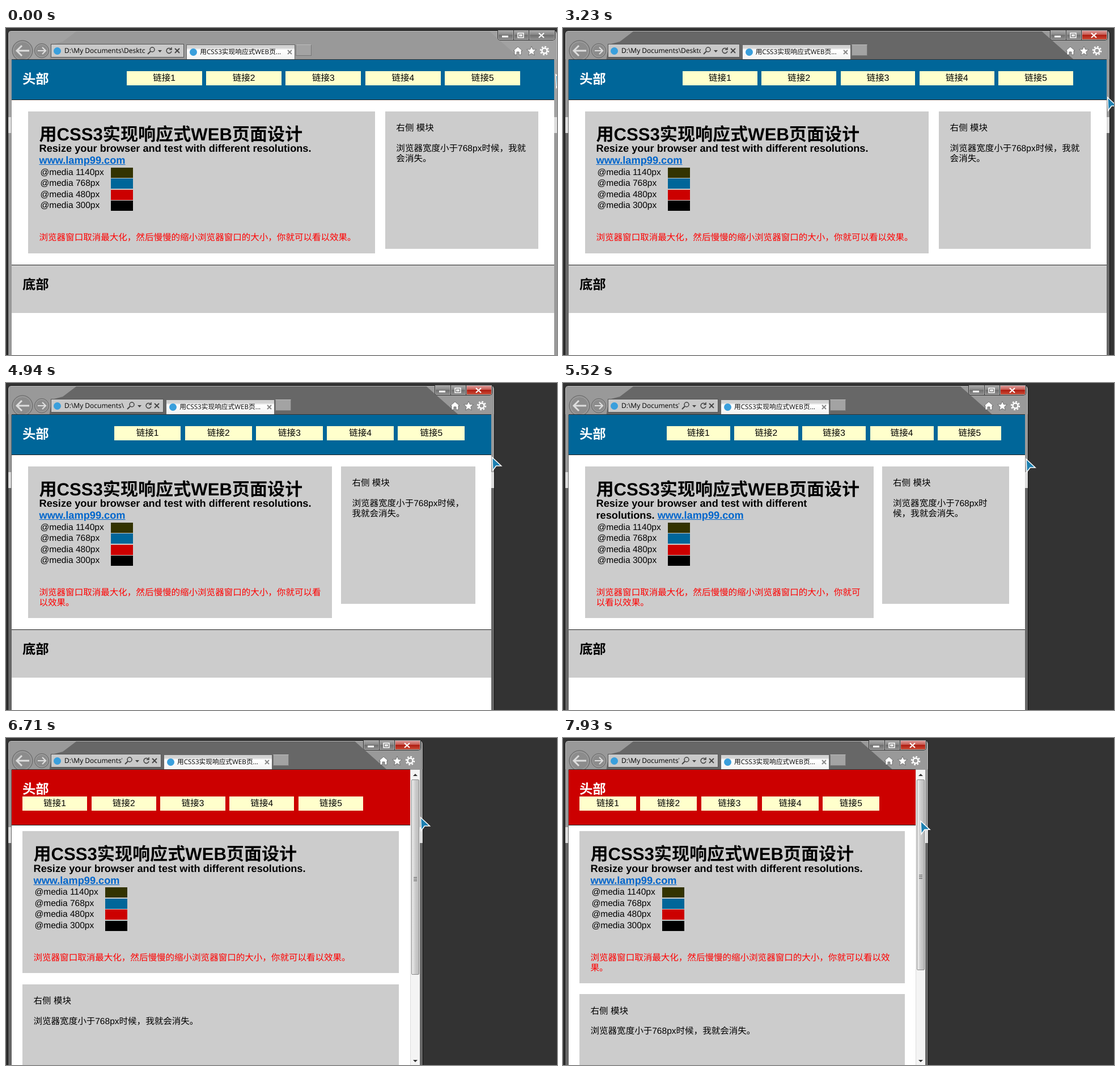
Write an HTML page that moves like this. It is 972 by 576 pixels and loops after 8000 ms.

```html
<!DOCTYPE html>
<html lang="zh-CN">
<head>
<meta charset="utf-8">
<title>响应式页面</title>
<style>
* { box-sizing: border-box; margin: 0; padding: 0; }
html, body { width: 972px; height: 576px; overflow: hidden; background: #333; }
body {
  position: relative;
  font: 15.54px/17.8px 'Liberation Sans', 'Noto Sans CJK SC', 'Noto Sans CJK', sans-serif;
  text-rendering: geometricPrecision;
  text-spacing-trim: space-all;
  --shade: color-mix(in srgb, #999, #676767 calc(var(--on) * 100%));
  --shine: color-mix(in srgb, #a2a2a2, #999 calc(var(--on) * 100%));
}
body > *, .win > * { position: absolute; }
svg { overflow: visible; fill: none; stroke: #fff; }

/* browser frame */
.win {
  left: 3px; top: 4px; width: calc(var(--R) - 3px); height: 600px;
  border: 1px solid #111; border-radius: 6px 6px 0 0; overflow: hidden;
  background: var(--shade); box-shadow: inset 0 0 0 1px #bbb;
}
.edge {
  top: 50px; width: 5px; height: 540px;
  background: linear-gradient(var(--shine) 102px, #ddd 102px 130px, var(--shade) 130px);
}
.glare { top: 1px; height: 50px; background: var(--shine); }
.glare.l { left: 1px; width: 119px; clip-path: polygon(0 0, 100% 0, 80% 36%, 64% 46%, 60% 100%, 0 100%); }
.glare.r { right: 1px; width: 118px; clip-path: polygon(0 0, 100% 0, 100% 100%, 48% 100%); }
.buttons { left: calc(var(--R) - 106px); top: 4px; display: flex; height: 18px; border: 1px solid #333; border-top: 0; border-radius: 0 0 5px 5px; overflow: hidden; }
.buttons i { width: 27px; box-shadow: inset 0 0 0 1px #aaa; background: linear-gradient(#aaa, #858585 50%, #707070 50%, #909090); }
.buttons i + i { border-left: 1px solid #333; }
.buttons i:last-child { width: 46px; position: relative; }
.buttons i:last-child::after { content: ''; position: absolute; inset: 1px; opacity: var(--on); background: linear-gradient(#d99, #c65348 50%, #b01d12 50%, #c84a35); }
.address {
  left: 79px; top: 28px; width: calc(var(--A) - 79px); height: 24px;
  background: #c9c9c9; border: 1px solid #555;
}
.address span, .tab span { position: absolute; white-space: nowrap; overflow: hidden; font-family: 'Open Sans', 'Noto Sans CJK SC', 'Noto Sans CJK', sans-serif; }
.address span { left: 23px; right: 68px; font-size: 12px; line-height: 22px; }
.dot { position: absolute; width: 13px; height: 13px; border-radius: 50%; background: #3a9fdc; }
.tab {
  left: calc(var(--A) + 4px); top: 29px; width: 192px; height: 26px;
  border: 1px solid #666; border-bottom: 0; background: linear-gradient(#d2d2d2 20%, #fff 35%, #f2f2f2);
}
.tab span { left: 23px; font-size: 11.7px; line-height: 25px; }
.stub { left: calc(var(--A) + 197px); top: 29px; width: 28px; height: 20px; background: #a3a3a3; border: 1px solid #777; border-top-color: #bbb; }

/* page */
.page {
  left: 9.5px; top: 55px; width: var(--W); height: 521px;
  border-top: 1px solid #333; background: #fff; overflow: hidden;
}
header { position: relative; height: 71px; background: #069; border-bottom: 1px solid #222; }
h2 { font-size: 23.35px; line-height: 30px; padding: 19px 0 0 19.5px; }
header h2 { color: #fff; }
nav { position: absolute; display: flex; gap: 7.4px; top: 20px; left: calc(var(--W) * .197 + 14.4px); }
nav a { width: calc(var(--W) * .1368 + 2px); height: 25px; background: #ffc; text-align: center; line-height: 26px; }
main, aside { background: #ccc; }
main { margin: 19.5px 0 0 29.5px; padding: 23px 19.15px 17.5px 19.5px; width: calc(var(--inner) * .68); }
h1 { font-size: 31.1px; line-height: 35.6px; }
h3 { font-size: 18.2px; line-height: 21.2px; margin-top: -3px; }
h3 a { color: #06c; text-decoration: underline; }
.row { position: relative; height: 19.6px; line-height: 20px; padding-left: 2px; }
.row i { position: absolute; left: 126.5px; top: 1px; width: 39px; height: 18px; }
.red { color: red; margin-top: 38.5px; }
aside { position: absolute; top: 91px; right: 28.5px; width: calc(var(--inner) * .3); height: 242px; padding: 21.3px 17px 0 19.5px; }
aside p + p { margin-top: 17.8px; }
footer { margin-top: 20px; height: 85px; background: #ccc; border-top: 1.5px solid #222; }
.bar { display: none; top: 56px; left: calc(var(--R) - 22.7px); width: 17px; height: 520px; background: #f4f4f4; border-left: 1px solid #ddd; }
.bar i { position: absolute; left: 1px; top: 17px; width: 14px; height: var(--thumb); border: 1px solid #888; border-radius: 2px; background: linear-gradient(90deg, #eee, #ccc 50%, #bbb); }
.bar i::after { content: ''; position: absolute; left: 3px; top: 50%; width: 6px; height: 7px; background: repeating-linear-gradient(#555 0 1px, transparent 1px 3px); }
.bar svg { position: absolute; fill: #333; stroke: none; }

.narrow .bar { display: block; }
.narrow header { height: 98px; background: #c00; }
.narrow nav { left: 19.5px; top: 47px; }
.narrow nav a { width: calc(var(--W) * .1597 + 2px); }
.narrow main { margin: 10px 19.5px 0; width: auto; }
.narrow aside { position: static; margin: 19.5px 19.5px 0; width: auto; }
.cursor { left: 0; top: 0; transform: translate(var(--x), var(--y)); }
</style>
</head>
<body>
<div class="win">
  <div class="glare l"></div><div class="glare r"></div>
  <div class="edge" style="left:0"></div><div class="edge" style="right:0"></div>
</div>
<svg width="80" height="56">
  <g fill="#8c8c8c" stroke="#666"><circle cx="29" cy="40" r="18"/><circle cx="63" cy="40" r="12.5"/></g>
  <g stroke="#a8a8a8"><circle cx="29" cy="40" r="16"/><circle cx="63" cy="40" r="11"/></g>
  <g stroke="#ddd">
    <path d="M41 40H20M28 31l-9 9 9 9" stroke-width="3"/>
    <path d="M56 40h13M64 34l6 6-6 6" stroke-width="2.2"/>
  </g>
</svg>
<div class="buttons"><i></i><i></i><i></i></div>
<svg style="left:calc(var(--R) - 106px);top:0" width="106" height="56">
  <path d="M8 15h11" stroke-width="3"/>
  <path d="M36 9h10v8h-10zM39 12h4v2h-4z" stroke-width="1.5"/>
  <path d="M73 9l9 8M82 9l-9 8" stroke-width="2.2"/>
  <path d="M36 33l8 7h-2v7h-4v-5h-4v5h-4v-7h-2z" fill="#fff" stroke="#555" stroke-width=".7"/>
  <path d="M60 32l2.3 5.6 6 .4-4.6 4 1.5 6-5.2-3.2-5.2 3.2 1.5-6-4.6-4 6-.4z" fill="#fff" stroke="#555" stroke-width=".7"/>
  <circle cx="83" cy="40" r="4.5" stroke-width="2.5"/>
  <circle cx="83" cy="40" r="7" stroke-width="2.5" stroke-dasharray="2.75"/>
</svg>
<div class="address"><b class="dot" style="left:4px;top:5px"></b><span>D:\My Documents\Desktop\index.html</span></div>
<svg style="left:calc(var(--A) - 70px);top:28px;stroke:#444" width="70" height="24">
  <circle cx="14" cy="10" r="4" stroke-width="1.5"/>
  <path d="M11 13l-5 5" stroke-width="2"/>
  <path d="M24 11h7l-3.5 4z" fill="#444" stroke="none"/>
  <path d="M47 9a4.5 4.5 0 1 0 1 4M48 6v4h-4" stroke-width="1.5"/>
  <path d="M54 8l8 8M62 8l-8 8" stroke-width="1.8"/>
</svg>
<div class="tab"><b class="dot" style="left:5px;top:6px"></b><span>用CSS3实现响应式WEB页...</span>
  <svg style="position:absolute;left:177px;top:8px;stroke:#888" width="9" height="9"><path d="M1 1l7 7M8 1l-7 7" stroke-width="2"/></svg>
</div>
<div class="stub"></div>
<div class="page">
  <header><h2>头部</h2>
    <nav><a>链接1</a><a>链接2</a><a>链接3</a><a>链接4</a><a>链接5</a></nav>
  </header>
  <main>
    <h1>用CSS3实现响应式WEB页面设计</h1>
    <h3>Resize your browser and test with different resolutions. <a>www.lamp99.com</a></h3>
    <div class="row">@media 1140px<i style="background:#330"></i></div>
    <div class="row">@media 768px<i style="background:#069"></i></div>
    <div class="row">@media 480px<i style="background:#c00"></i></div>
    <div class="row">@media 300px<i style="background:#000"></i></div>
    <p class="red">浏览器窗口取消最大化，然后慢慢的缩小浏览器窗口的大小，你就可以看以效果。</p>
  </main>
  <aside><p>右侧 模块</p><p>浏览器宽度小于768px时候，我就会消失。</p></aside>
  <footer><h2>底部</h2></footer>
</div>
<div class="bar"><i></i><svg width="16" height="520"><path d="M4 11h8l-4-4zM4 511h8l-4 4z"/></svg></div>
<svg class="cursor" width="20" height="26"><path d="M0 0l16 15h-9l-6 8z" fill="#1c7fb0" stroke-width="1.5"/></svg>

<script>
const LOOP = 8000, DRAG_START = 3170, STEP = 58.77;
// [drag step, right edge of the window]
const edgeKeys = [[0, 968], [12, 929.5], [13, 924], [28, 867], [30, 861.7], [42, 813], [48, 781], [56, 742], [60, 735.5], [71, 691], [81, 645]];
// [ms, x, y] while the pointer approaches the window edge
const approach = [[890, 970, 84], [1050, 955, 98], [1280, 967, 119], [1440, 969, 121]];

function lerpKeys(keys, at, column = 1) {
  if (at <= keys[0][0]) return keys[0][column];
  const i = keys.findIndex(key => key[0] >= at);
  if (i < 0) return keys[keys.length - 1][column];
  const a = keys[i - 1], b = keys[i];
  return a[column] + (b[column] - a[column]) * (at - a[0]) / (b[0] - a[0]);
}

function pointer(t, step, right) {
  if (t < 100) return [970, 82];
  if (t < 890) return [990, 82];
  if (t < 2180) {
    const tick = t < 1280 ? 890 + Math.floor((t - 890) / 55) * 55 : t < 1420 ? 1280 : 1440;
    return [lerpKeys(approach, tick), lerpKeys(approach, tick, 2)];
  }
  return [right - 4 - 2 * Math.max(0, step - 76), 122 + .3 * step];
}

function draw(now) {
  const t = now % LOOP;
  const dragging = t >= DRAG_START;
  const step = dragging ? Math.min(81, Math.floor((t - DRAG_START) / STEP + .15)) : 0;
  const right = dragging ? lerpKeys(edgeKeys, step) : t < 2180 ? 973 : 971;
  const content = right - 5.7;
  const narrow = content - 9.5 < 747;
  const width = content - 9.5 - (narrow ? 17 : 0);
  const [x, y] = pointer(t, step, right);
  const active = t < 1600 ? 0 : Math.min(1, (1 + Math.floor((t - 1600) / 60)) / 3);
  const px = {
    R: right, W: width, x, y,
    A: Math.max(274, 278 + (right - 861) * .324),
    inner: content - 67.5,
    thumb: width < 637 ? 336 : 344
  };
  const body = document.body;
  for (const name in px) body.style.setProperty('--' + name, px[name].toFixed(2) + 'px');
  body.style.setProperty('--on', active);
  body.classList.toggle('narrow', narrow);
  requestAnimationFrame(() => draw(performance.now()));
}
draw(performance.now());
</script>
</body>
</html>
```
